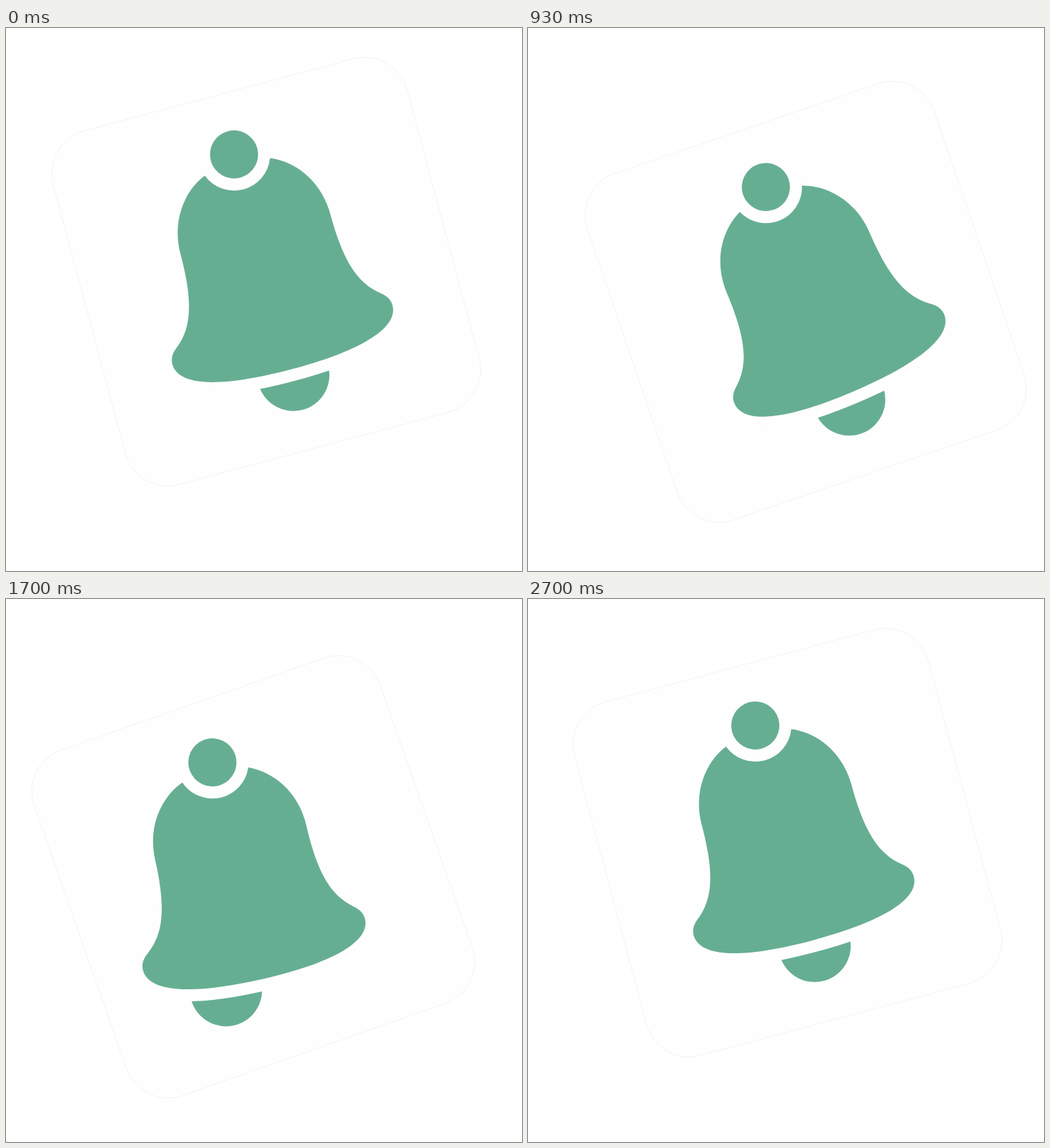
An HTML page that plays this animation: 729x768 px, repeating every 2730 ms.

```html
<!DOCTYPE html>
<html lang="en">
<head>
<meta charset="utf-8">
<title>Bell</title>
<style>
  html, body { margin: 0; width: 100%; height: 100%; overflow: hidden; background: #fff; }
  svg { display: block; width: 100%; height: 100%; }
  .card { fill: #fefefe; stroke: #ededed; stroke-width: .6; }
  .bell { fill: #66ae92; }
  #body { stroke: #fefefe; stroke-width: 34; paint-order: stroke; }
</style>
</head>
<body>
<svg viewBox="0 0 729 768">
  <g id="card">
    <rect class="card" x="-259" y="-259" width="518" height="518" rx="62"/>
    <g class="bell" transform="translate(-1 -171.8)">
      <circle id="clapper" cx=".2" cy="322.9" r="51"/>
      <path id="body" d="M47.7 18.2C82 32 109 69 109.5 115C109.5 190 123 222 149 243
        C157 249 161 256 161 264C161 299 95 314.5 0 314.5C-95 314.5 -161 299 -161 264
        C-161 256 -157 249 -149 243C-123 222 -109.5 190 -109.5 115
        C-109 69 -82 32 -47.7 18.2A51 51 0 0 0 47.7 18.2Z"/>
      <circle r="34"/>
    </g>
  </g>
</svg>
<script>
  const LOOP = 2730, FRAME = 100 / 3;
  const [card, body, clapper] = ['card', 'body', 'clapper'].map(id => document.getElementById(id));

  // [frame, body angle, clapper angle], relative to the card
  const swing = [[0, 0, 0], [20, 0, 0], [35, 7.8, 4.6], [50, -6.5, -16], [78, 0, 0], [82, 0, 0]];
  const ease = p => p * p * (3 - 2 * p);

  function swingAt(frame, part) {
    const i = swing.findIndex(key => key[0] > frame);
    const from = swing[i - 1], to = swing[i];
    const p = ease((frame - from[0]) / (to[0] - from[0]));
    return from[part] + (to[part] - from[part]) * p;
  }

  function draw(ms) {
    const frame = Math.floor((ms % LOOP + 5) / FRAME);
    const phase = (4.418 * frame - 2) * Math.PI / 180;
    const x = 368.6 + 28 * Math.sin(phase);
    const y = 372.5 - 28 * Math.cos(phase);
    const tilt = 17.5 - 2.5 * Math.cos(phase);
    card.setAttribute('transform', `translate(${x} ${y}) rotate(${-tilt})`);
    body.setAttribute('transform', `rotate(${-swingAt(frame, 1)})`);
    clapper.setAttribute('transform', `rotate(${-swingAt(frame, 2)})`);
  }

  const start = performance.now();
  function tick() {
    draw(performance.now() - start);
    requestAnimationFrame(tick);
  }
  tick();
</script>
</body>
</html>
```
